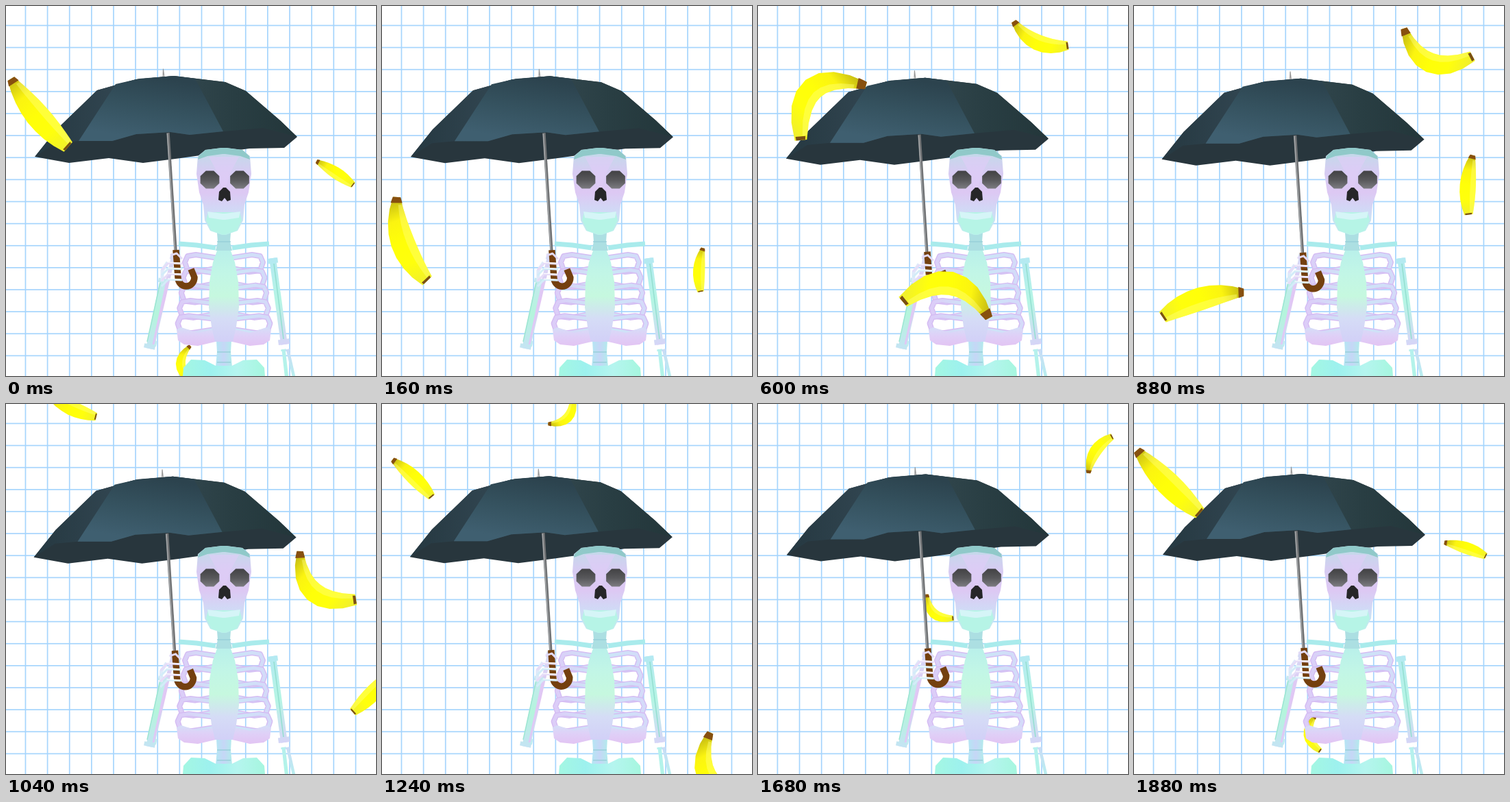
These frames come from a looping animation (540 px wide and 540 px high, 1.92 s). An HTML page with a canvas:

```html
<!DOCTYPE html>
<html lang="en">
<head>
<meta charset="utf-8">
<title>Banana rain</title>
<style>
html, body { margin: 0; width: 100%; height: 100%; overflow: hidden; background: #fff; }
canvas { display: block; width: 100vw; height: 100vh; }
</style>
</head>
<body>
<canvas id="stage" width="540" height="540"></canvas>
<script>
const ctx = document.getElementById('stage').getContext('2d');
const STEP = 40, STEPS = 48, GRAVITY = 1.4, MID = 318;

// State at step `at`; speeds, spin (degrees) and tumble (radians) are per step
const bananas = [
  { at: 0, x: 269, y: 522, vx: .5, vy: 42, angle: 90, spin: 8, size: 52, roll: .8, tumble: 0, behind: true },
  { at: 0, x: 49, y: 156, vx: -1.3, vy: 43.2, angle: 50, spin: 5, size: 130, roll: .1, tumble: .05 },
  { at: 0, x: 480, y: 244, vx: -3.3, vy: 32.5, angle: 33, spin: 15, size: 64, roll: -.05, tumble: .055 },
  { at: 8, x: 249, y: 72, vx: 3.6, vy: 48.2, angle: 174, spin: 2.4, size: 128, roll: -.17, tumble: .16 },
  { at: 15, x: 110, y: 156, vx: -1.3, vy: 35.1, angle: 140, spin: 3.3, size: 124, roll: 1.4, tumble: .22 },
  { at: 15, x: 413, y: 40, vx: 11.2, vy: 26.7, angle: 24, spin: 10, size: 87, roll: .44, tumble: -.045 },
  { at: 22, x: 444, y: 53, vx: 6.5, vy: 46.5, angle: 22, spin: 4.7, size: 108, roll: .9, tumble: 0 },
  { at: 26, x: 96, y: 2, vx: -10.4, vy: 17.8, angle: 25, spin: 3.7, size: 79, roll: .13, tumble: -.043 }
];

function poly(points, fill) {
  ctx.fillStyle = fill;
  ctx.fill(new Path2D('M' + points + 'Z'));
}

function line(points, color, width) {
  ctx.strokeStyle = color;
  ctx.lineWidth = width;
  ctx.stroke(new Path2D('M' + points));
}

function grad(x0, y0, x1, y1, ...colors) {
  const g = ctx.createLinearGradient(x0, y0, x1, y1);
  colors.forEach((c, i) => g.addColorStop(i / (colors.length - 1), c));
  return g;
}

// Completes a right half, given as offsets from the axis
function mirror(half, axis = MID) {
  const points = half.split(' ').map(p => p.split(',').map(Number));
  return points.map(([x, y]) => [axis + x, y])
    .concat(points.reverse().map(([x, y]) => [axis - x, y])).join(' ');
}

function grid() {
  ctx.fillStyle = '#fff';
  ctx.fillRect(0, 0, 540, 540);
  ctx.fillStyle = '#a6d5fd';
  for (let p = 27.6; p < 540; p += 32.13) {
    ctx.fillRect(p, 0, 1.7, 540);
    ctx.fillRect(0, p, 540, 1.7);
  }
}

// Runs a drawing in the umbrella's gentle sway
function swayed(step, draw) {
  const s = (1 - Math.cos(step / STEPS * 2 * Math.PI)) / 2;
  ctx.save();
  ctx.translate(-1.5 * s, 3.9 * s);
  draw();
  ctx.restore();
}

function canopy() {
  const dome = '42,220 74,180 133,123 190,107 245,102 320,111 350,124 400,167 425,191 ';
  line('229,104 229.5,92 231,104', '#999', 1.2);
  poly(dome + '406,207 355,208 255,222 200,229 150,222 92,229', '#28363d');
  poly(dome + '375,178 318,183 268,188 240,184 190,187 155,197 106,197 73,200',
    grad(60, 0, 425, 0, '#273a43', '#30444f', '#33484f', '#293e43', '#23363a'));
  poly('160,114 195,106 245,102 276,106 317,183 268,188 240,184 190,187 155,197 106,197',
    grad(220, 104, 205, 195, '#2c434e', '#35525f', '#3f5f70'));
}

function handle() {
  line('236.5,185 247.5,357', '#707274', 4.4);
  line('235.5,186 246.5,357', '#a5a8aa', 1.5);
  line('248,356 251,396 A12,13 0 0 0 275,396 L270,384', '#74400f', 9.5);
}

function hand() {
  line('228,402 228,386 236,374', '#dfeafa', 5);
  for (let i = 0; i < 4; i++) {
    const y = 376 + i * 8;
    line(`227,${y + 9} 237,${y - 1} 257,${y}`, i % 2 ? '#d3ecf8' : '#e6dcf8', 3);
    line(`236,${y - 2} 256,${y - 1}`, '#fff', 1);
  }
  line('240,364 249,361 257,369', '#e2daf6', 3);
}

function bone(x0, y0, x1, y1, width, ...colors) {
  const fill = grad(x0, y0, x1, y1, ...colors);
  const knob = k => `${x0 + (x1 - x0) * k},${y0 + (y1 - y0) * k}`;
  line(`${knob(0)} ${knob(1)}`, fill, width * .75);
  line(`${knob(0)} ${knob(.06)}`, fill, width * 1.1);
  line(`${knob(.94)} ${knob(1)}`, fill, width * 1.25);
}

function arms() {
  bone(245, 362, 214, 496, 8, '#d4dcf6', '#e3c4f3', '#bfeef0');
  bone(230, 398, 209, 500, 13, '#c6e8f1', '#b4f5dc', '#c4e4f3');
  line('225,404 206,490', '#9de6d2', 1.5);
  line('235,402 215,494', '#dfc9f5', 3);
  bone(389, 368, 406, 494, 13, '#b4e9f2', '#b5f5e4', '#d6d5f7');
  line('391,376 405,486', '#93dfd0', 1.5);
  bone(405, 501, 410, 545, 7, '#b7f0ee', '#b0f5e6');
  bone(411, 501, 421, 545, 6, '#c9dcf6', '#b7f0ee');
}

function ribs() {
  for (let i = 0; i < 5; i++) {
    const y = 364 + 22.3 * i, r = 57 + 2.6 * i;
    const half = `8,${y + 4} ${r - 16},${y - 1} ${r - 4},${y + 1} ${r},${y + 10} ${r - 4},${y + 22} ${r - 20},${y + 24} 8,${y + 18}`;
    const loop = mirror(half);
    line(loop, '#d5bdf3', 8);
    line(loop, grad(255, 0, 381, 0, '#dccdf8', '#c9eaf6', '#d4daf9'), 5);
  }
  poly(mirror('8,470 38,477 62,469 69,472 67,488 58,494 38,496 8,489'),
    grad(0, 466, 0, 496, '#d3e2f8', '#dfd0f7', '#e2c4f3'));
}

function torso() {
  ribs();
  const spine = grad(306, 0, 330, 0, '#b3e7f3', '#c6d6f6', '#b0eceb');
  poly(mirror('10,331 9,344 12,357'), '#acdfe2');
  poly(mirror('11,488 10,505 12,527'), spine);
  for (const y of [344, 505, 520]) line(`308,${y} 328,${y}`, '#97cfd9', 1.4);
  for (const side of [-1, 1]) {
    const x = d => MID + side * d;
    line(`${x(12)},353 ${x(40)},349 ${x(66)},347`, '#a9ebec', 7);
  }
  poly(mirror('10,357 16,374 21,402 22,440 18,468 13,490'),
    grad(0, 357, 0, 490, '#b9f0ea', '#c2f6e6', '#c6f8df', '#d5dcf6', '#d2d0f7'));
  poly(mirror('12,525 28,517 48,516 59,528 60,540'),
    grad(257, 0, 377, 0, '#a4f7e2', '#9df1ee', '#b5f5ef', '#a6f6df'));
}

function eye(cx) {
  const corners = [];
  for (let i = 0; i < 8; i++) {
    const a = (i + .5) * Math.PI / 4;
    corners.push([cx + 15 * Math.cos(a), 253.5 + 14 * Math.sin(a)]);
  }
  poly(corners.join(' '), grad(0, 240, 0, 267, '#414143', '#57575a', '#7d7d82'));
}

function skull() {
  poly(mirror('3,207 27,210 38,219 40,245 36,272 30,290 28,313 20,328 3,334'),
    grad(0, 210, 0, 334, '#c0dce8', '#d6ccf2', '#ddc8f3', '#cfdcf6', '#b9f3ea'));
  poly(mirror('22,220 10,242 3,264'), 'rgba(225,205,248,.6)');
  poly(mirror('3,207 27,210 37,219 38,224 24,219 2,216'), '#90c9c9');
  poly(mirror('23,301 26,313 18,328 2,333'), '#b6f4e6');
  poly(mirror('2,303 24,300 22,309 2,312'), '#d5f5f7');
  eye(297.5);
  eye(341);
  poly(mirror('2,265 8,271 9,283 4,285 0,280', 319), '#262628');
}

function banana({ x, y, vx, vy, angle, spin, size, roll, tumble }, n) {
  const bend = .38 * size * Math.sin(roll + tumble * n);
  const half = u => .135 * size * Math.sin(Math.PI * (.07 + .78 * u)) ** .8;
  const edge = (u, off) => {
    const slope = 4 * bend * (1 - 2 * u) / size, k = off / Math.hypot(1, slope);
    return [(u - .5) * size - slope * k, 4 * bend * u * (1 - u) + k].map(v => v.toFixed(2)).join();
  };
  const strip = (from, to, lo, hi) => {
    const left = [], right = [];
    for (let i = 0; i <= 8; i++) {
      const u = from + (to - from) * i / 8;
      left.push(edge(u, half(u) * lo));
      right.unshift(edge(u, half(u) * hi));
    }
    return left.concat(right).join(' ');
  };
  const inner = bend < 0 ? 1 : -1;
  ctx.save();
  ctx.translate(x + vx * n, y + vy * n + GRAVITY * n * n / 2);
  ctx.rotate((angle + spin * n) * Math.PI / 180);
  poly(strip(0, 1, -1, 1), grad(-size / 2, 0, size / 2, 0, '#c2b814', '#fbf410', '#ffff08', '#ffff0c', '#f1f02c'));
  poly(strip(.08, .97, inner * .3, inner), 'rgba(255,255,130,.4)');
  poly(strip(0, .06, -1.1, 1.1), '#87500f');
  poly(strip(.975, 1, -.75, .75), '#7a5013');
  ctx.restore();
}

function rain(step, behind) {
  for (const b of bananas) {
    if (!!b.behind !== behind) continue;
    // Steps since the given state, from 20 before to 27 after
    banana(b, (step - b.at + 20 + STEPS) % STEPS - 20);
  }
}

function draw(step) {
  ctx.lineJoin = 'round';
  grid();
  rain(step, true);
  swayed(step, canopy);
  arms();
  torso();
  skull();
  swayed(step, () => { handle(); hand(); });
  rain(step, false);
}

const start = performance.now();
function tick() {
  draw(Math.floor((performance.now() - start) / STEP) % STEPS);
  requestAnimationFrame(tick);
}
tick();
</script>
</body>
</html>
```
